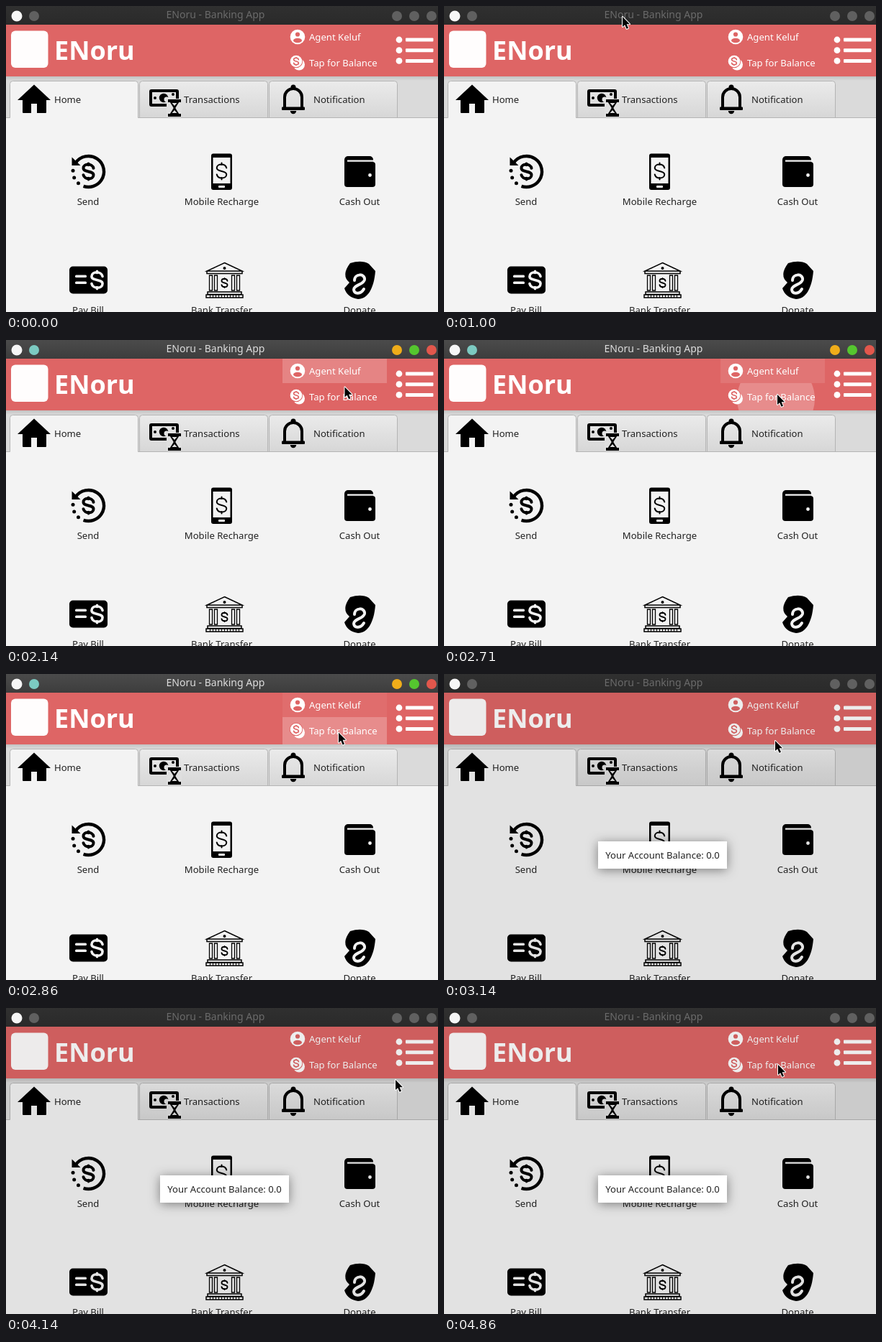
Write an HTML page with a canvas that moves like this. It is 600x426 px and loops after 5.01 s.

```html
<!DOCTYPE html>
<html lang="en">
<head>
<meta charset="utf-8">
<title>Banking App</title>
<style>
html, body { margin: 0; width: 100%; height: 100%; overflow: hidden; background: #f3f3f3; }
canvas { display: block; width: 600px; height: 426px; }
</style>
</head>
<body>
<canvas id="stage" width="600" height="426"></canvas>
<script>
const ctx = document.getElementById('stage').getContext('2d');
const LOOP = 5010, FPS = 7, LAST = 34;
const INK = '#000', RED = '#de6565', PAGE = '#f3f3f3', WHITE = '#fff';

// Steps at which the window wakes up, the button is pressed, the dialog is open
const WAKE = 8, PRESS = 17, OPEN = 22;

// Where the pointer rests or turns
const STOPS = [
  { at: 4, x: 310, y: 384 },
  { at: 7, x: 248, y: 15 },
  { at: 11, x: 478, y: 55 },
  { at: 19, x: 463, y: 76 },
  { at: OPEN, x: 460, y: 93 },
  { at: 29, x: 541, y: 100 },
  { at: LAST, x: 464, y: 79 }
];

const clamp = v => Math.max(0, Math.min(1, v));
const mix = (a, b, k) => a + (b - a) * k;

function fill(color, build) {
  ctx.fillStyle = color;
  ctx.beginPath();
  build();
  ctx.fill();
}
function stroke(color, width, build) {
  ctx.strokeStyle = color;
  ctx.lineWidth = width;
  ctx.beginPath();
  build();
  ctx.stroke();
}
function rect(color, x, y, w, h, r = 0) {
  fill(color, () => ctx.roundRect(x, y, w, h, r));
}
function disc(color, x, y, r) {
  fill(color, () => ctx.arc(x, y, r, 0, 7));
}
function triangle(color, x, y, halfWidth, height) {
  fill(color, () => {
    ctx.moveTo(x, y);
    ctx.lineTo(x + halfWidth, y + height);
    ctx.lineTo(x - halfWidth, y + height);
  });
}
function at(x, y, paint) {
  ctx.save();
  ctx.translate(x, y);
  paint();
  ctx.restore();
}
function text(str, x, y, color = '#222', size = 13.1, align = 'left', weight = 400) {
  ctx.font = `${weight} ${size}px "Noto Sans", sans-serif`;
  ctx.textAlign = align;
  ctx.fillStyle = color;
  ctx.fillText(str, x, y);
}
function fade(y0, y1, a, b) {
  const g = ctx.createLinearGradient(0, y0, 0, y1);
  g.addColorStop(0, a);
  g.addColorStop(1, b);
  return g;
}

// Dollar sign of height h around its centre
function dollar(x, y, h, width, color = INK) {
  const w = h * .27, q = h * .36;
  at(x, y, () => {
    ctx.lineCap = 'round';
    stroke(color, width, () => {
      ctx.moveTo(w, -q * .5);
      ctx.bezierCurveTo(w * .8, -q * 1.25, -w, -q * 1.25, -w, -q * .5);
      ctx.bezierCurveTo(-w, q * .15, w, -q * .15, w, q * .5);
      ctx.bezierCurveTo(w, q * 1.25, -w * .8, q * 1.25, -w, q * .5);
      for (const side of [-1, 1]) {
        ctx.moveTo(0, side * q);
        ctx.lineTo(0, side * (h - width) / 2);
      }
    });
  });
}

function titleBar(active) {
  rect(active ? fade(0, 26, '#4b4b4b', '#3d3d3d') : fade(0, 26, '#303030', '#2a2a2a'), 0, 0, 600, 26);
  const light = (x, color) => disc(active ? color : '#606060', x, 14, 7);
  light(39, '#7ccac1');
  light(543, '#f0ad1a');
  light(567, '#55c62f');
  light(591, '#e2574c');
  disc('#f6f6f6', 15, 14, 7.5);
  text('ENoru - Banking App', 291, 17, active ? '#dedede' : '#6b6b6b', 14, 'center');
}

function header(step) {
  rect(RED, 0, 26, 600, 72);
  rect('#fffdfd', 7, 34.5, 51.5, 51.5, 6);
  text('ENoru', 67, 75, WHITE, 36, 'left', 700);

  const glow = .2 * clamp((step - 9) / 2) * clamp((21 - step) / 4);
  rect(`rgba(255,255,255,${glow})`, 384, 26, 145, 34);
  ripple(step);

  disc(WHITE, 405, 43, 10.3);
  disc(RED, 405, 39.5, 3.1);
  fill(RED, () => ctx.ellipse(405, 48, 6, 3.2, 0, 0, 7));
  text('Agent Keluf', 421, 48, WHITE);

  disc(WHITE, 407, 81.5, 8);
  disc(RED, 403, 77, 9.2);
  disc(WHITE, 403, 77, 8.3);
  dollar(403, 77, 12.5, 1.6, RED);
  text('Tap for Balance', 421, 84, WHITE);

  for (let y = 47; y < 80; y += 14.7) {
    disc(WHITE, 546, y, 4.4);
    rect(WHITE, 555, y - 2.5, 38.5, 5, 1);
  }
}

function ripple(step) {
  const age = step - PRESS;
  if (age < 1 || age > 3) return;
  ctx.save();
  ctx.beginPath();
  ctx.rect(384, 60, 145, 38);
  ctx.clip();
  disc('rgba(255,255,255,.25)', 461, 82, age * 27);
  ctx.restore();
}

function tab(i, label, open) {
  const x = 5.5 + 180 * i;
  const shape = () => ctx.roundRect(x, 104.5, 178, 55, 4);
  ctx.save();
  ctx.beginPath();
  ctx.rect(0, 98, 600, open ? 58 : 57);
  ctx.clip();
  fill(open ? PAGE : fade(104, 155, '#ebebeb', '#d7d7d7'), shape);
  stroke('#b4b4b4', 1, shape);
  ctx.restore();
  text(label, x + 61.5, 135);
}

function tabs() {
  rect('#dadada', 0, 98, 600, 57);
  rect(fade(98, 104, 'rgba(0,0,0,.11)', 'rgba(0,0,0,0)'), 0, 98, 600, 6);
  rect('#b4b4b4', 0, 155, 600, 1);
  ['Home', 'Transactions', 'Notification'].forEach((label, i) => tab(i, label, i === 0));
  house();
  banknote();
  bell();
}

function house() {
  triangle(INK, 39, 109.5, 23, 21.5);
  rect(INK, 23, 129, 33, 20, 1);
  rect(PAGE, 35, 136, 8, 13);
}

function banknote() {
  stroke(INK, 4, () => ctx.roundRect(201, 118, 37, 20, 1));
  disc(INK, 219, 128, 6.2);
  disc('#e2e2e2', 223, 130, 3.5);
  disc(INK, 207, 128, 2);
  disc(INK, 232, 123, 2);
  rect('#dfdfdf', 223, 129, 21, 26);
  // Hourglass: two mirrored halves
  for (const side of [-1, 1]) {
    rect(INK, 225, 140 + side * 10, 18, 4);
    triangle(INK, 234, 142 - side * 2, 8, side * 13);
    triangle('#dfdfdf', 234, 142 + side * 3, 3.5, side * 4);
  }
}

function bell() {
  stroke(INK, 4, () => {
    ctx.moveTo(387, 143);
    ctx.lineTo(387, 127);
    ctx.arc(399, 127, 12, Math.PI, 0);
    ctx.lineTo(411, 143);
  });
  disc(INK, 399, 113, 3.5);
  rect(INK, 383, 140.5, 32, 4.5, 1);
  fill(INK, () => ctx.arc(399, 146, 4.2, 0, Math.PI));
}

function sendIcon() {
  at(114.5, 230.5, () => {
    stroke(INK, 4.4, () => ctx.arc(0, 0, 21.5, -2.55, 1.9));
    for (let i = 0; i < 3; i++) {
      const a = 3.2 - i * .46;
      disc(INK, 21.5 * Math.cos(a), 21.5 * Math.sin(a), 2.5);
    }
    fill(INK, () => {
      ctx.moveTo(-23, -20);
      ctx.lineTo(-23, -8.5);
      ctx.lineTo(-11, -8.5);
    });
  });
  dollar(114.5, 230.5, 26, 4);
}

function phoneIcon() {
  rect(INK, 285, 205.5, 29, 50.5, 3);
  rect(PAGE, 287.5, 211, 24, 36);
  rect(PAGE, 295, 250, 9, 3, 1);
  dollar(299.5, 230, 25, 2);
}

function walletIcon() {
  rect(INK, 470, 209, 40, 20, 5);
  rect(INK, 470, 217, 43, 35, 4);
  rect(PAGE, 474, 214.5, 37, 2.2);
  disc(PAGE, 505.5, 235.5, 2.4);
}

function billIcon() {
  rect(INK, 88, 362.5, 53, 38, 5);
  for (const y of [374.5, 383.5]) rect(PAGE, 96, y, 16, 3.6, 1.5);
  dollar(126.5, 381.5, 28, 3.6, PAGE);
}

function bankIcon() {
  at(303.5, 0, () => {
    stroke(INK, 1.5, () => {
      ctx.moveTo(0, 357.5);
      ctx.lineTo(24.5, 369);
      ctx.lineTo(-24.5, 369);
      ctx.closePath();
      ctx.rect(-24.5, 369, 49, 3.5);
      ctx.rect(-23.5, 398, 47, 3.5);
      ctx.rect(-25.5, 402, 51, 4);
    });
    disc(INK, 0, 365, 2);
    for (const side of [-1, 1]) {
      for (const x of [12, 19]) stroke(INK, 1.3, () => ctx.rect(side * x - 2, 375, 4, 21));
    }
    for (let x = -20; x <= 20; x += 4) rect(INK, x - .5, 402, 1, 4);
  });
  dollar(303.5, 385.5, 15, 1.8);
}

function donateIcon() {
  fill(INK, () => {
    ctx.moveTo(478, 358);
    ctx.quadraticCurveTo(494, 353, 504, 359);
    ctx.lineTo(513, 369);
    ctx.bezierCurveTo(511, 394, 502, 408, 489, 408);
    ctx.quadraticCurveTo(474, 406, 470, 393);
    ctx.lineTo(477, 385);
    ctx.quadraticCurveTo(465, 375, 478, 358);
  });
  at(490, 387, () => {
    ctx.lineCap = 'round';
    stroke(PAGE, 4, () => {
      ctx.moveTo(-6, -5);
      ctx.bezierCurveTo(-6, -15, 9, -15, 8, -6);
      ctx.bezierCurveTo(7, 1, -7, 1, -7, 8);
      ctx.bezierCurveTo(-6, 15, 3, 14, 7, 7);
    });
  });
}

function services() {
  sendIcon();
  phoneIcon();
  walletIcon();
  billIcon();
  bankIcon();
  donateIcon();
  const names = ['Send', 'Mobile Recharge', 'Cash Out', 'Pay Bill', 'Bank Transfer', 'Donate'];
  names.forEach((name, i) => {
    const x = 114 + (i % 3) * 188.5 - (i % 3 === 1 ? 3 : 0);
    text(name, x, i < 3 ? 277 : 428, '#222', 13.1, 'center');
  });
}

function dialog(step) {
  const k = clamp((step - OPEN + 2) / 2);
  if (!k) return;
  rect(`rgba(0,0,0,${.07 * k})`, 0, 26, 600, 400);
  at(303.5, 252, () => {
    const size = mix(.6, 1, k);
    ctx.scale(size, size);
    ctx.shadowColor = 'rgba(0,0,0,.45)';
    ctx.shadowBlur = 15;
    ctx.shadowOffsetY = 2;
    rect(WHITE, -89.5, -19, 179, 38);
    ctx.shadowColor = 'transparent';
    text('Your Account Balance: 0.0', 0, 5, '#222', 13.1, 'center');
  });
}

function pointer(step) {
  if (step < STOPS[0].at) return;
  const n = Math.max(1, STOPS.findIndex(s => s.at >= step));
  const a = STOPS[n - 1], b = STOPS[n];
  const k = (step - a.at) / (b.at - a.at);
  at(mix(a.x, b.x, k), mix(a.y, b.y, k), () => {
    const arrow = new Path2D('M0 0V14L3.2 11.2L5.6 16.8L8 15.8L5.6 10.2H10Z');
    ctx.lineJoin = 'round';
    ctx.lineWidth = 2;
    ctx.strokeStyle = WHITE;
    ctx.stroke(arrow);
    ctx.fillStyle = INK;
    ctx.fill(arrow);
  });
}

function draw(time) {
  // The screen refreshes seven times a second
  const step = Math.min(LAST, Math.floor((time % LOOP + 5) * FPS / 1000));
  rect(PAGE, 0, 0, 600, 426);
  header(step);
  tabs();
  services();
  dialog(step);
  titleBar(step >= WAKE && step < OPEN - 1);
  pointer(step);
}

const start = performance.now();
function tick() {
  draw(performance.now() - start);
  requestAnimationFrame(tick);
}
tick();
</script>
</body>
</html>
```
